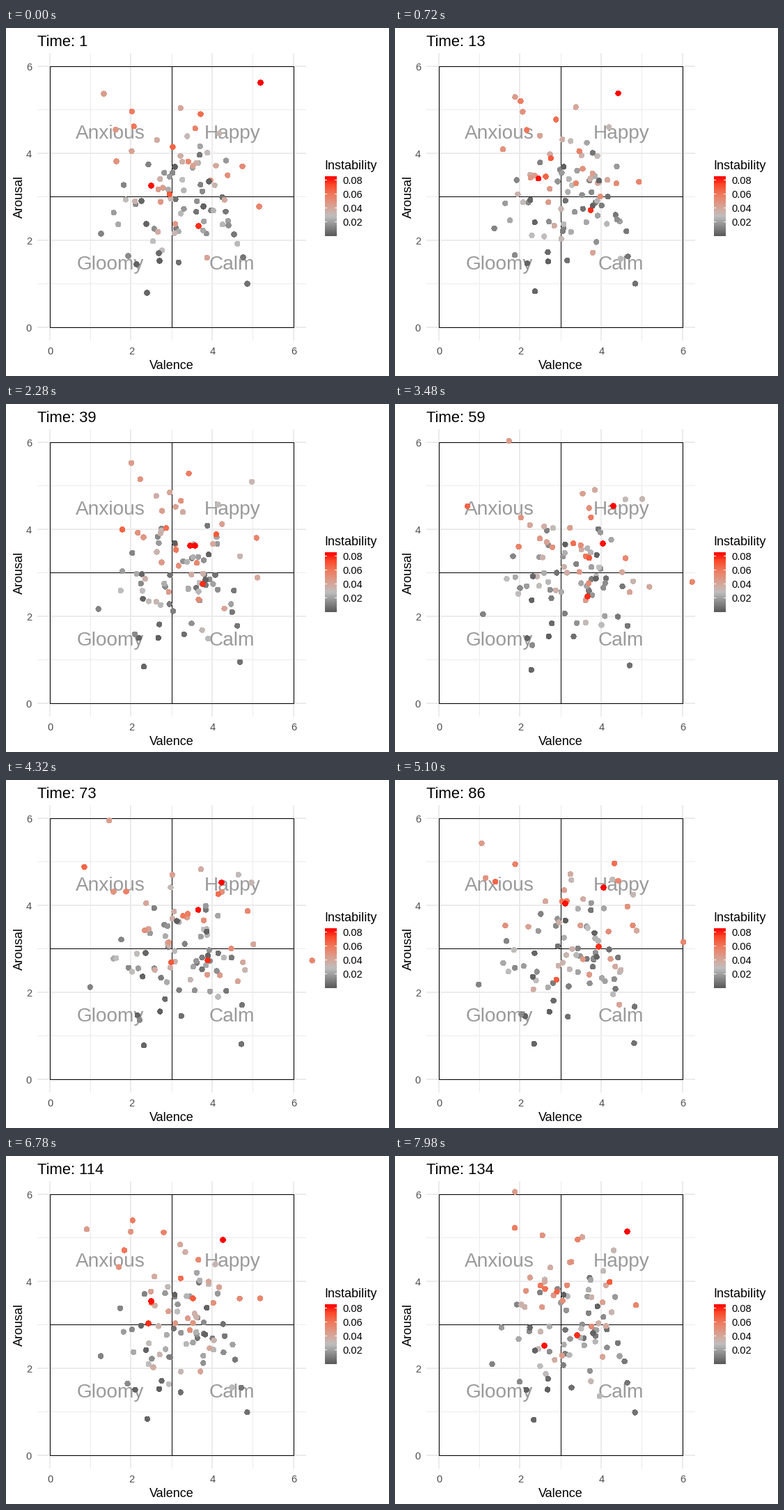
Write a matplotlib script that moves like this. It is 550 px wide and 500 px high and loops after 8000 ms.

```python
import numpy as np
import matplotlib.pyplot as plt
from matplotlib.animation import FuncAnimation
from matplotlib.colors import LinearSegmentedColormap
from matplotlib.patches import Rectangle

W, H, DPI = 550, 500, 100
PX = 72 / DPI                      # one pixel in points
TICK, STEP, LOOP = 20, 60, 8000    # ms
LAST = 134
COUNT = 76                         # dots placed by chance
TOP = .0855                        # highest instability

plt.rcParams["font.family"] = "Liberation Sans"
cmap = LinearSegmentedColormap.from_list("instability", [
    (0, "#595959"), (.33, "#bebebe"), (.47, "#d5a79b"),
    (.70, "#ef7a5d"), (.87, "#fb4527"), (1, "#ff0000")])

fig = plt.figure(figsize=(W / DPI, H / DPI), dpi=DPI, facecolor="white")
ax = fig.add_axes([0, 0, 1, 1])
ax.axis("off")


def px(v):
    return 63.2 + v * 350 / 6


def py(a):
    return 430.2 - a * 375 / 6


def box(x, y, w, h, color, z):
    ax.add_patch(Rectangle((x, y), w, h, fc=color, lw=0, zorder=z,
                           antialiased=False))


def label(x, y, text, size, color="black", ha="left", **kw):
    return ax.text(x, y, text, fontsize=size * PX, color=color, ha=ha,
                   va=kw.pop("va", "baseline"), zorder=3, **kw)


# panel
for v in range(7):
    major = v % 2 == 0
    width, back = (2, 1) if major else (1, 0)
    x, y = int(px(v)), int(py(v))
    box(x - back, 36, width, 413, "#ebebeb", 0)
    box(45, y - back, 386, width, "#ebebeb", 0)
    if v % 3 == 0:
        box(x, 55, 1, 376, "black", 2)
        box(63, y, 351, 1, "black", 2)
    if major:
        label(px(v), 469, str(v), 14.67, "#4d4d4d", "center")
        label(37, py(v) + 5.5, str(v), 14.67, "#4d4d4d", "right")
for v, a, word in ((1.5, 4.5, "Anxious"), (4.5, 4.5, "Happy"),
                   (1.5, 1.5, "Gloomy"), (4.5, 1.5, "Calm")):
    label(px(v) - 1, py(a) + 10.5, word, 28, "#9a9a9a", "center")
label(238, 490, "Valence", 18, ha="center")
label(27.5, 242, "Arousal", 18, ha="right", va="center", rotation=90)
title = label(45, 26, "", 22)

# colour bar
label(457.5, 203, "Instability", 18)
ax.imshow(np.linspace(1, 0, 86)[:, None], cmap=cmap, aspect="auto",
          extent=(458, 475, 299, 213), zorder=1)
for level in (.02, .04, .06, .08):
    y = round(298 - level * 1000)
    box(458, y, 3, 1, "white", 2)
    box(472, y, 3, 1, "white", 2)
    label(483.5, y + 6, f"{level:.2f}", 14.67)

# outermost dots: first place and instability
outer = [(202, 380, .004), (220, 334, .002), (187, 339, .003),
         (219, 323, .005), (194, 248, .004), (201, 281, .003),
         (242, 199, .002), (283, 256, .003), (291, 220, .003),
         (346, 367, .007), (340, 329, .008), (327, 296, .009),
         (136, 295, .012), (175, 327, .014), (319, 283, .015),
         (140, 94, .045), (158, 191, .05), (363, 256, .055)]
# the three fastest dots cross the panel by way points
hot_levels = [.0855, .083, .078]
hot_times = [1, 24, 39, 59, 86, 114, 134]
hot = [
    [365, 78, 287, 120, 271, 203, 313, 146, 299, 154, 311, 120, 333, 108],
    [208, 226, 214, 208, 264, 203, 298, 200, 244, 177, 208, 208, 214, 272],
    [276, 284, 283, 248, 282, 258, 276, 276, 292, 239, 204, 240, 261, 257]]

steps = np.arange(1, LAST + 1)
rng = np.random.default_rng(11)


def glide(times, rows):
    """Smooth cubic path through the way points of each dot."""
    pts = np.array(rows, float).reshape(len(rows), -1, 2)
    times = np.array(times, float)
    slope = np.gradient(pts, times, axis=1)
    i = np.clip(np.searchsorted(times, steps, "right") - 1, 0, len(times) - 2)
    span = (times[i + 1] - times[i])[:, None]
    u = (steps - times[i])[:, None] / span
    return ((1 + 2 * u) * (1 - u) ** 2 * pts[:, i]
            + u * (1 - u) ** 2 * span * slope[:, i]
            + u * u * (3 - 2 * u) * pts[:, i + 1]
            + u * u * (u - 1) * span * slope[:, i + 1])


def wander(levels):
    """Slow and quick swings whose speed is the instability."""
    path = np.zeros((len(levels), LAST, 2))
    for low, high, share in ((80, 140, .75), (38, 65, .4)):
        freq = 2 * np.pi / rng.uniform(low, high, (len(levels), 1, 2))
        phase = rng.uniform(0, 2 * np.pi, (len(levels), 1, 2))
        size = levels[:, None, None] * 60 * share / freq
        path += size * np.sin(freq * steps[None, :, None] + phase)
    return path


# the cloud: livelier dots sit higher
q = np.linspace(.08, .97, COUNT)
cloud_levels = .003 + .05 * q ** 1.1 + .025 * q ** 12
spread = np.clip(rng.normal(size=(COUNT, 2)), -1.8, 1.8) * [45, 48]
home = np.column_stack([np.full(COUNT, 250), 280 - 1600 * cloud_levels])
cloud = (home + spread)[:, None] + wander(cloud_levels)

outer = np.array(outer)
swing = wander(outer[:, 2])
edge = outer[:, None, :2] + swing - swing[:, :1]

paths = np.concatenate([cloud, edge, glide(hot_times, hot)]) + .5
levels = np.concatenate([cloud_levels, outer[:, 2], hot_levels])

dots = ax.scatter(paths[:, 0, 0], paths[:, 0, 1], s=(7.3 * PX) ** 2,
                  c=cmap(levels / TOP), linewidths=0, antialiased=False,
                  zorder=4)
ax.set_xlim(0, W)
ax.set_ylim(H, 0)


def update(k):
    step = min(k * TICK // STEP, LAST - 1)
    title.set_text(f"Time: {step + 1}")
    dots.set_offsets(paths[:, step])
    return dots, title


anim = FuncAnimation(fig, update, frames=LOOP // TICK, interval=TICK,
                     repeat=True, repeat_delay=0, blit=False)
plt.show()
```
